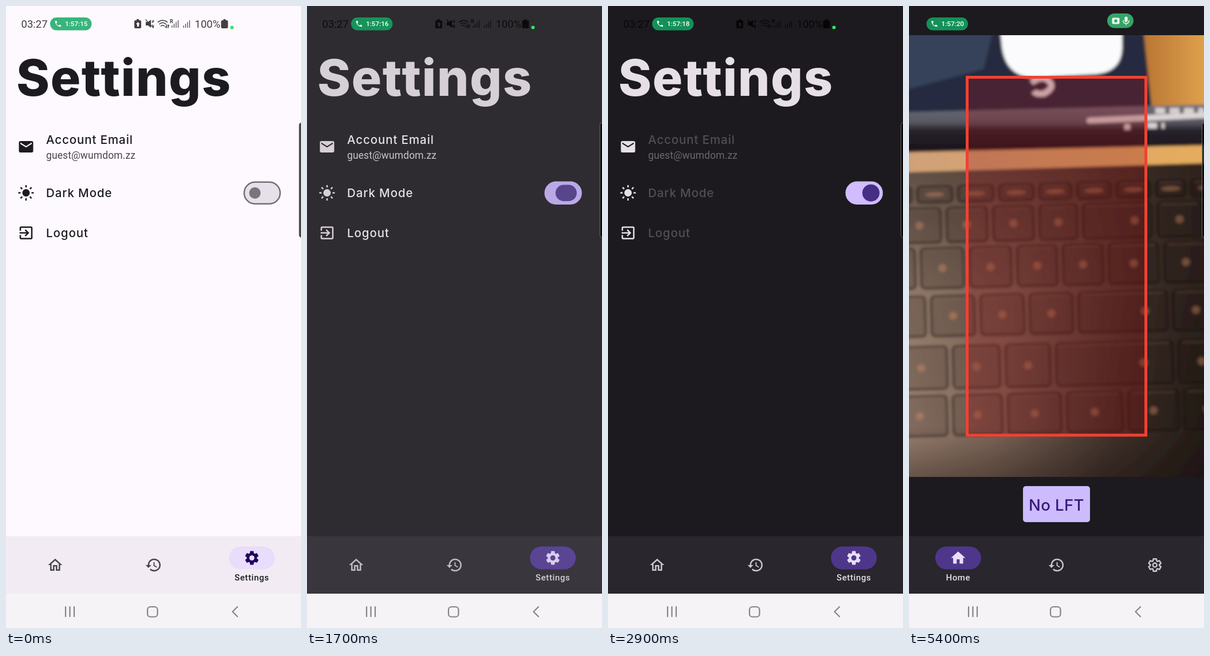
An HTML page for the animation above (5500 ms loop, 515x1087 px).

```html
<!DOCTYPE html>
<html lang="en">
<head>
<meta charset="utf-8">
<title>Theme switch</title>
<style>
html, body { margin: 0; width: 100%; height: 100%; overflow: hidden; background: #f5f3f6; }
svg { display: block; width: 100%; height: 100%; }
text { font-family: Inter, sans-serif; white-space: pre; }
.rob { font-family: Roboto, sans-serif; }
.mid { text-anchor: middle; }
.line { fill: none; stroke-linecap: round; stroke-linejoin: round; }
.title { font-size: 88px; font-weight: 800; }
.ink { fill: var(--ink); }
.row { fill: var(--text); font-size: 20.5px; font-weight: 500; letter-spacing: .9px; }
.violet { fill: #ccbbfd; }
.deep { fill: #37187a; }
.pale { fill: #e6e0e9; }
.field { fill: none; stroke: #49454f; stroke-width: 1.25; }
.tab { font-size: 17.5px; letter-spacing: .4px; font-weight: 500; }
</style>
</head>
<body>
<svg viewBox="0 0 515 1087" preserveAspectRatio="none">
  <defs>
    <path id="mail" d="M20 4H4c-1.1 0-2 .9-2 2v12c0 1.1.9 2 2 2h16c1.1 0 2-.9 2-2V6c0-1.1-.9-2-2-2zm0 4l-8 5-8-5V6l8 5 8-5v2z"/>
    <path id="exit" d="M10.1 15.6L11.5 17l5-5-5-5-1.4 1.4L12.7 11H3v2h9.7zM19 3H5c-1.1 0-2 .9-2 2v4h2V5h14v14H5v-4H3v4c0 1.1.9 2 2 2h14c1.1 0 2-.9 2-2V5c0-1.1-.9-2-2-2z"/>
    <path id="home" d="M12 5.7l5 4.5V18h-2v-6H9v6H7v-7.8l5-4.5M12 3L2 12h3v8h6v-6h2v6h6v-8h3z"/>
    <path id="homeOn" d="M10 20v-6h4v6h5v-8h3L12 3 2 12h3v8z"/>
    <path id="past" d="M13 3c-5 0-9 4-9 9H1l3.9 3.9.1.1L9 12H6c0-3.9 3.1-7 7-7s7 3.1 7 7-3.1 7-7 7c-1.9 0-3.7-.8-4.9-2.1l-1.4 1.4C8.3 20 10.5 21 13 21c5 0 9-4 9-9s-4-9-9-9zm-1 5v5l4.3 2.5.7-1.2-3.5-2.1V8z"/>
    <path id="call" d="M6.6 10.8c1.4 2.8 3.8 5.1 6.6 6.6l2.2-2.2c.3-.3.7-.4 1-.2 1.1.4 2.3.6 3.6.6.5 0 1 .4 1 1V20c0 .5-.5 1-1 1C10.6 21 3 13.4 3 4c0-.6.5-1 1-1h3.5c.6 0 1 .5 1 1 0 1.3.2 2.5.6 3.6.1.3 0 .7-.3 1z"/>
    <g id="gear"><path data-gear="8.8" fill="none" stroke="currentColor" stroke-width="2" stroke-linejoin="round"/><circle cx="12" cy="12" r="2.8" fill="none" stroke="currentColor" stroke-width="2"/></g>
    <path id="gearOn" data-gear="9.8" fill-rule="evenodd"/>
    <linearGradient id="desk" x1="0" y1=".6" x2="1" y2=".85"><stop stop-color="#a68c7a"/><stop offset=".35" stop-color="#80685a"/><stop offset=".7" stop-color="#42332c"/><stop offset="1" stop-color="#211813"/></linearGradient>
    <linearGradient id="shade" x1="0" y1="0" x2="0" y2="1"><stop stop-color="#2b201a" stop-opacity=".6"/><stop offset=".4" stop-color="#2b201a" stop-opacity=".15"/><stop offset=".8" stop-color="#160f0c" stop-opacity="0"/><stop offset="1" stop-color="#160f0c" stop-opacity=".5"/></linearGradient>
    <linearGradient id="bezel" x1="0" y1="0" x2="0" y2="1"><stop stop-color="#6d6d7b"/><stop offset=".35" stop-color="#575762"/><stop offset=".5" stop-color="#27222b"/><stop offset="1" stop-color="#171218"/></linearGradient>
    <linearGradient id="hinge"><stop stop-color="#cfa07a"/><stop offset="1" stop-color="#e6ad5c"/></linearGradient>
    <linearGradient id="wood"><stop stop-color="#b87532"/><stop offset="1" stop-color="#e5a852"/></linearGradient>
    <filter id="soft" x="-5%" y="-5%" width="110%" height="110%"><feGaussianBlur stdDeviation="2.5"/></filter>
    <clipPath id="view"><path d="M0 51H515V823H0z"/></clipPath>
  </defs>

  <rect width="515" height="1027" fill="var(--bg)"/>

  <g id="settings">
    <text class="title ink" x="18" y="157" letter-spacing="1.4">Settings</text>
    <g class="ink">
      <use href="#mail" transform="translate(20 231) scale(1.25)"/>
      <circle cx="35" cy="326.5" r="6.5"/>
      <path id="rays" stroke="var(--ink)" stroke-width="2.5"/>
      <use href="#exit" transform="translate(20 381.5) scale(1.25)"/>
    </g>
    <text class="row" x="70" y="241">Account Email</text>
    <text class="rob" x="70" y="267" font-size="17.5" letter-spacing=".1" fill="var(--sub)">guest@wumdom.zz</text>
    <text class="row" x="70" y="334">Dark Mode</text>
    <text class="row" x="70" y="404">Logout</text>
    <rect id="track" x="415.8" y="307.8" width="62.8" height="37.9" rx="19" stroke-width="2.5"/>
    <rect id="thumb"/>
  </g>

  <g id="history">
    <text class="title pale" x="19" y="157" letter-spacing="-.5">History</text>
    <text class="mid pale" x="475" y="103" font-size="17.5" font-weight="500" letter-spacing=".3">Export</text>
    <circle class="violet" cx="475" cy="138.5" r="25"/>
    <path class="line" d="M469 128l11.500 10.500L469 149" stroke="#37187a" stroke-width="3"/>
    <rect class="violet" x="25" y="211" width="465" height="134" rx="12"/>
    <text class="deep" x="50" y="248.5" font-size="17" letter-spacing=".4">Total of LFT Scans</text>
    <text class="deep" x="49" y="308" font-size="50" font-weight="800">1</text>
    <text class="deep" x="76" y="298" font-size="23" font-weight="500" letter-spacing=".8">scans</text>
    <path class="line" d="M444.500 267l11.500 11-11.500 11.500" stroke="#fff" stroke-width="3"/>
    <rect class="field" x="25.5" y="365.8" width="464" height="59" rx="12"/>
    <text x="35" y="402" font-size="18" letter-spacing=".4" fill="#c3bec5">Search by result...</text>
    <path class="line" d="M461.500 396.500l8 8M463.500 391.500a6.800 6.800 0 1 0-13.600 0a6.800 6.800 0 1 0 13.600 0" stroke="#cac4d0" stroke-width="2.6"/>
    <rect class="field" x="25.5" y="446" width="464" height="195" rx="12"/>
    <text class="pale" x="38" y="483" font-size="22" font-weight="500" letter-spacing=".8">Date Filter</text>
    <rect class="violet" x="39" y="501.5" width="437.5" height="63" rx="10"/>
    <text class="tab mid deep" x="148.5" y="537">Exact Date</text>
    <text class="tab mid deep" x="367" y="537">Date Range</text>
    <path class="deep" d="M101 565v-2q0-4 4-4h87q4 0 4 4v2z"/>
    <rect class="field" x="39" y="578.5" width="436.5" height="49" rx="12" style="stroke:#938f99"/>
    <text class="pale" x="54" y="610" font-size="20" letter-spacing=".9">From date</text>
    <rect x="25.7" y="667.5" width="464" height="101.5" rx="10" fill="#484449" stroke="#dcd6de" stroke-width="1.3"/>
    <text class="pale" x="46" y="709" font-size="17" font-weight="700" letter-spacing=".2">22/04/2024 03:26:55</text>
    <text class="pale" x="46" y="739" font-size="17">KWY00060931</text>
    <rect x="283" y="678" width="186" height="80" rx="5" fill="#f44336"/>
    <g class="deep" font-size="16.5" font-weight="700">
      <text class="mid" x="309" y="711.5">C</text>
      <text class="mid" x="309" y="737">T</text>
      <path d="M336 693h13v50h-13z"/>
      <text x="367" y="723.5" letter-spacing=".6">POSITIVE</text>
    </g>
    <path d="M338 706h9M338 731.500h9" stroke="#f44336" stroke-width="2.2"/>
  </g>

  <g id="camera">
    <g clip-path="url(#view)">
      <g filter="url(#soft)">
        <path d="M-20 30H535V850H-20z" fill="url(#desk)"/>
        <path d="M-20 270H535V850H-20z" fill="url(#shade)"/>
        <path d="M-20 30H440V200H-20z" fill="#262a3f"/>
        <path d="M-20 30H150L130 110-20 150z" fill="#35435a"/>
        <path d="M408 30H535V180H424z" fill="url(#wood)"/>
        <path d="M158 30H372V75q-2 40-45 44l-115 6q-44-5-50-55z" fill="#fbfafc"/>
        <path d="M214 134q18-14 30-3t-8 22q-14 2-18-4" fill="none" stroke="#e6e2ea" stroke-width="10"/>
        <path d="M-20 186L535 172V246L-20 262z" fill="url(#bezel)"/>
        <path d="M315 200L535 190" stroke="#ddd6d6" stroke-width="10" stroke-linecap="round"/>
        <path d="M376 211h10m30-2h30m-16-26h85" stroke="#d9d0d0" stroke-width="10" stroke-dasharray="17 8"/>
        <path d="M-20 256L535 243V274L-20 291z" fill="url(#hinge)"/>
        <g id="keys"></g>
      </g>
      <rect x="101.5" y="124.5" width="312" height="625.5" fill="#96161a" fill-opacity=".3" stroke="#f14133" stroke-width="5"/>
    </g>
    <rect class="violet" x="199" y="839" width="117" height="63" rx="5"/>
    <text class="mid deep" x="257.5" y="881.5" font-size="27.5" font-weight="500" letter-spacing=".4">No LFT</text>
  </g>

  <rect y="926.5" width="515" height="100.5" fill="var(--nav)"/>
  <g id="tabs"></g>

  <g id="status">
    <g opacity=".74">
      <text class="rob" x="26.5" y="37.5" font-size="18.5">03:27</text>
      <text class="rob" x="329.5" y="37.5" font-size="18.5">100%</text>
      <path fill-rule="evenodd" d="M228 25v-2h4v2h2q2 0 2 2v10q0 2-2 2h-8q-2 0-2-2v-10q0-2 2-2zM230 28l-3 4h2v4h3v-4h2z"/>
      <path d="M379.500 25v-2h4v2h2q2 0 2 2v10q0 2-2 2h-8q-2 0-2-2v-10q0-2 2-2z"/>
      <path d="M244 28h4l5-4v14l-5-4h-4z"/>
      <path class="line" d="M244 24l13 14M255.500 26v3m0 4v3m2-11v3m0 6v3" stroke="#000" stroke-width="1.4"/>
      <path class="line" d="M265.500 28q8-6 16 0M268 31.500q5.500-4.500 11 0M270.500 35q3-2.500 6 0M280 33v5m-1.500-1.500l1.500 1.500m3-5v5m0-5l1.500 1.500" stroke="#000" stroke-width="1.6"/>
      <path d="M290 38v-4m3.500 4v-7m3.500 7v-10m3.500 10v-13M310 38v-4m3.500 4v-7m3.500 7v-10m3.500 10v-13" stroke="#000" stroke-width="1.2"/>
      <text class="rob" x="286" y="29.5" font-size="9" font-weight="700">R</text>
    </g>
    <circle cx="394.5" cy="37.5" r="3" fill="#2eea62"/>
  </g>
  <g id="call-pill">
    <rect x="77" y="20" width="72.5" height="22.5" rx="11.2" fill="#12a864" fill-opacity=".84"/>
    <use href="#call" transform="translate(84 24.300) scale(.57)" fill="#fff"/>
    <text id="clock" class="rob" x="103" y="35.3" font-size="11.7" font-weight="500" fill="#fff"></text>
  </g>
  <g id="sensors">
    <rect x="346" y="13" width="46" height="25.5" rx="12.7" fill="#35a468"/>
    <rect x="354.5" y="20.5" width="13" height="11" rx="2" fill="#e9f6ee"/>
    <circle cx="361" cy="26" r="2.7" fill="#35a468"/>
    <rect x="376.3" y="18.5" width="5.4" height="9.5" rx="2.7" fill="#e9f6ee"/>
    <path class="line" d="M374 25.500q0 5 5 5t5-5M379 30.500v2.500" stroke="#e9f6ee" stroke-width="1.5"/>
  </g>

  <rect x="511.5" y="203.5" width="14" height="201.5" rx="5" fill="#000" fill-opacity=".72" stroke="#999" stroke-opacity=".65"/>

  <rect y="1027" width="515" height="60" fill="#f5f3f6"/>
  <g class="line" stroke="#858387" stroke-width="2.2">
    <path d="M104 1050v17m7.500-17v17m7.500-17v17M404 1050l-8.500 8.500 8.500 8.500"/>
    <rect x="247" y="1050" width="17.5" height="17.5" rx="5"/>
  </g>
</svg>

<script>
const $ = id => document.getElementById(id);
const clamp = x => Math.min(1, Math.max(0, x));
const lerp = (a, b, k) => a + (b - a) * k;
const rgb = hex => [1, 3, 5].map(i => parseInt(hex.slice(i, i + 2), 16));
const blend = (a, b, k) => a.map((v, i) => lerp(v, b[i], k));
const css = c => `rgb(${c.map(Math.round)})`;
const themed = (light, dark, k) => blend(rgb(light), rgb(dark), k);
const set = (el, attrs) => Object.entries(attrs).forEach(([k, v]) => el.setAttribute(k, v));
const show = (id, on) => $(id).style.display = on ? '' : 'none';

// Icons made of repeated spokes
const spoke = (cx, cy, r, deg) => {
  const a = deg * Math.PI / 180;
  return `${(cx + r * Math.cos(a)).toFixed(2)} ${(cy + r * Math.sin(a)).toFixed(2)}`;
};
document.querySelectorAll('[data-gear]').forEach(el => {
  const r = +el.dataset.gear, pts = [];
  for (let k = 0; k < 6; k++)
    for (const [f, d] of [[.72, -24], [1, -14], [1, 14], [.72, 24]]) pts.push(spoke(12, 12, r * f, k * 60 + 30 + d));
  const hole = el.id ? 'M15.6 12a3.6 3.6 0 1 0-7.2 0a3.6 3.6 0 1 0 7.2 0z' : '';
  el.setAttribute('d', `M${pts.join('L')}z${hole}`);
});
let rays = '';
for (let a = 0; a < 360; a += 45) rays += `M${spoke(35, 326.5, 9.5, a)}L${spoke(35, 326.5, 13.5, a)}`;
$('rays').setAttribute('d', rays);

// Keyboard rows: top, height, then the left edge of each key
$('keys').innerHTML = [
  [310, 28, -60, 14, 85, 157, 227, 293, 362, 431, 492, 560],
  [348, 60, -20, 65, 146, 227, 303, 433, 520],
  [418, 70, -65, 20, 105, 188, 268, 348, 445, 530],
  [502, 70, -55, 38, 124, 210, 295, 460, 550],
  [590, 74, -25, 76, 168, 256, 470, 560],
  [676, 70, -30, 76, 172, 275, 382, 480, 570]
].map(([y, h, ...xs]) => xs.slice(0, -1).map((x, i) => {
  const w = xs[i + 1] - x - 10, slope = (260 - x) * .025;
  const top = h < 40, wide = w > 100;
  return `<g transform="translate(${x} ${y + slope}) rotate(-1.5)">
    <rect width="${w}" height="${h}" rx="7" fill="#1d1310" fill-opacity=".2" stroke="#120b09" stroke-opacity=".5" stroke-width="4"/>
    <path d="M6 3H${w - 6}" stroke="#b08d78" stroke-opacity=".3" stroke-width="2"/>
    <ellipse cx="${w * (wide ? .75 : .5)}" cy="${h / 2}" rx="${top ? 17 : 7}" ry="${top ? 4 : 7}" fill="#dc9468" fill-opacity=".4"/></g>`;
}).join('')).join('');

const tabs = [['Home', 'home', 'homeOn'], ['History', 'past', 'past'], ['Settings', 'gear', 'gearOn']];
$('tabs').innerHTML = tabs.map(([label], i) => `<g transform="translate(${85.8 + 171.7 * i} 0)"><g>
  <rect y="-20" height="40" rx="20" fill="var(--pill)"/>
  <use transform="translate(-15 -15) scale(1.25)"/>
  <text class="rob mid" y="39.8" font-size="15" font-weight="500" letter-spacing=".6" fill="var(--label)">${label}</text></g></g>`).join('');
const tabParts = [...$('tabs').children].map(g => {
  const box = g.firstElementChild;
  return [box, ...box.children];
});

// Light to dark, back, and dark again
const theme = (t, delay, span) => {
  const run = start => clamp((t - start - delay) / span);
  return run(716) - run(1684) + run(2666);
};

const emphasized = x => x < .166 ? .4 * (x / .166) ** 2 : 1 - .6 * (1 - (x - .166) / .834) ** 4.8;

function drawToggle(dark, q) {
  const trackMix = clamp(1.5 * q - .2), thumbMix = clamp(3 * q - 1.3);
  const track = blend(themed('#e6e0e9', '#36343b', dark), themed('#7c66b8', '#d0bcff', dark), trackMix);
  const thumb = blend(themed('#79747e', '#938f99', dark), themed('#dddcce', '#452f85', dark), thumbMix);
  const edge = blend(track, rgb('#746d7b'), clamp(2 * (1 - dark) - .16));
  set($('track'), { fill: css(track), stroke: css(edge) });
  const k = Math.abs(2 * q - 1), rest = q < .5 ? 20 : 30;
  const w = lerp(43, rest, k), h = lerp(27, rest, k);
  set($('thumb'), { x: lerp(434.5, 459, q) - w / 2, y: 326.7 - h / 2, width: w, height: h, rx: h / 2, fill: css(thumb) });
}

function drawTabs(t, dark) {
  const sel = t < 3600 ? 2 : t < 4700 ? 1 : 0;
  const age = [t - 4700, t - 3450, 500][sel];
  const v = emphasized(clamp(age / 500));
  const on = css(themed('#21005d', '#e8def8', dark)), idle = css(themed('#49454f', '#cac4d0', dark));
  tabParts.forEach(([box, pill, icon, label], i) => {
    const active = i === sel, last = i === sel + 1;
    const k = active ? v : last ? 1 - v : 0;
    const w = active ? 80 * (.4 + .6 * v) : 80;
    box.setAttribute('transform', `translate(0 ${964.5 + 12.5 * (1 - k)})`);
    set(pill, { x: -w / 2, width: w, opacity: active ? clamp(age / 100) : last ? clamp(1 - age / 100) : 0 });
    set(icon, { href: '#' + tabs[i][active ? 2 : 1], fill: active ? on : idle, color: idle });
    label.setAttribute('opacity', k);
  });
}

function draw(t) {
  const dark = theme(t, 0, 200), late = theme(t, 200, 130);
  const vars = {
    bg: themed('#fef9fe', '#1c1a1e', dark),
    nav: themed('#f2ebf4', '#29262d', dark),
    ink: themed('#1c1b1f', '#e6e0e6', dark),
    label: themed('#1c1b1f', '#e6e0e9', dark),
    pill: themed('#e8ddfb', '#4e378b', dark),
    text: themed('#1c1b1f', '#e6e0e9', late),
    sub: themed('#49454f', '#cac4d0', late)
  };
  for (const k in vars) document.body.style.setProperty('--' + k, css(vars[k]));
  drawToggle(dark, theme(t, -11, 100));
  drawTabs(t, dark);
  const sensing = t >= 5300;
  show('settings', t < 3600);
  show('history', t >= 3600 && t < 4700);
  show('camera', t >= 5200);
  show('status', !sensing);
  show('sensors', sensing);
  $('call-pill').setAttribute('transform', `translate(${sensing ? -46.5 : 0} 0)`);
  $('clock').textContent = '1:57:' + (15 + Math.floor((t + 200) / 1000));
}

// The screen refreshes ten times a second
function loop() {
  draw(Math.floor(performance.now() % 5500 / 100) * 100);
  requestAnimationFrame(loop);
}
loop();
</script>
</body>
</html>
```
